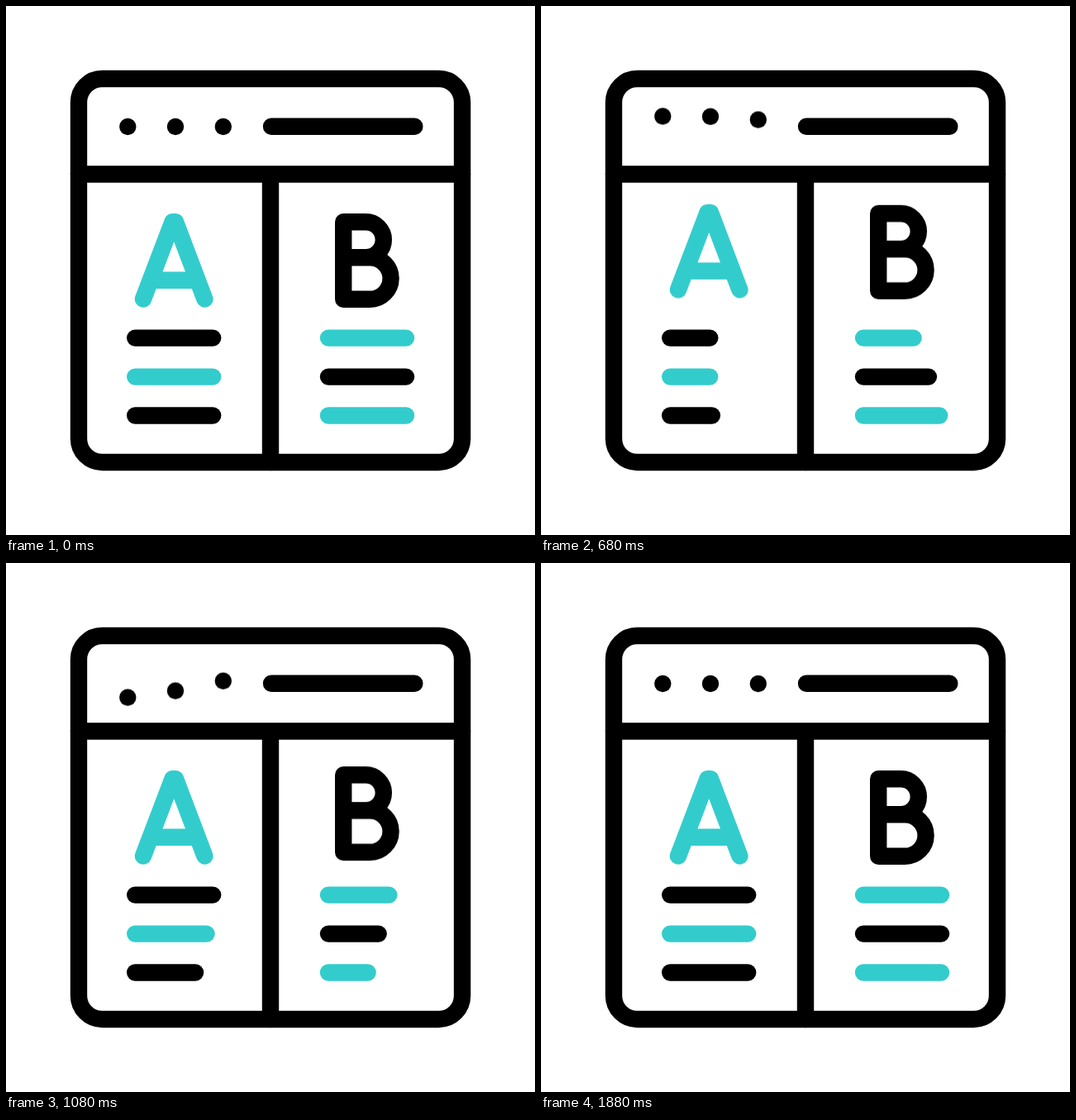
An HTML page without scripts that plays this animation: 640 by 640 pixels, repeating every 1.92 s.

```html
<!DOCTYPE html>
<html lang="en">
<head>
<meta charset="utf-8">
<title>A/B page</title>
<style>
html, body { margin: 0; width: 100%; height: 100%; overflow: hidden; background: #fff; }
svg { display: block; width: 100%; height: 100%; }

.ink { fill: none; stroke: #000; stroke-width: 20.4; stroke-linecap: round; stroke-linejoin: round; }
.teal { stroke: #33cccc; }
.dots { fill: #000; }

.move, .row { animation: 1920ms ease-in-out infinite; }
.row { stroke-dasharray: 94 200; stroke-dashoffset: 0; }

/* dots: one wave, passed along */
.dot { animation-name: wave; }
.d2 { animation-delay: 120ms; }
.d3 { animation-delay: 240ms; }
@keyframes wave {
  0%, 8.2% { transform: translateY(0); }
  33.3% { transform: translateY(-13px); }
  60.4% { transform: translateY(18px); animation-timing-function: cubic-bezier(.4, 0, .4, 1); }
  86.2%, 100% { transform: translateY(0); }
}

/* letters hop */
.a { animation-name: hop-a; }
.b { animation-name: hop-b; }
@keyframes hop-a {
  0%, 6.8% { transform: translateY(0); }
  31.9% { transform: translateY(-12px); }
  51.9%, 100% { transform: translateY(0); }
}
@keyframes hop-b {
  0%, 18.5% { transform: translateY(0); }
  41.7%, 42.7% { transform: translateY(-12px); }
  67.2%, 100% { transform: translateY(0); }
}

/* text rows shorten and grow back */
.a1 { animation-name: row-a1; }
.a2 { animation-name: row-a2; }
.a3 { animation-name: row-a3; }
.b1 { animation-name: row-b1; }
.b2 { animation-name: row-b2; }
.b3 { animation-name: row-b3; }
@keyframes row-a1 {
  0%, 9% { stroke-dashoffset: 0; }
  32.4% { stroke-dashoffset: 47.5; }
  55.9%, 100% { stroke-dashoffset: 0; }
}
@keyframes row-a2 {
  0%, 14% { stroke-dashoffset: 0; }
  38.6%, 39.2% { stroke-dashoffset: 47.5; }
  62.9%, 100% { stroke-dashoffset: 0; }
}
@keyframes row-a3 {
  0%, 18% { stroke-dashoffset: 0; }
  40.6%, 44% { stroke-dashoffset: 48.5; }
  66.9%, 100% { stroke-dashoffset: 0; }
}
@keyframes row-b1 {
  0%, 20% { stroke-dashoffset: 0; }
  43% { stroke-dashoffset: 43; }
  69%, 100% { stroke-dashoffset: 0; }
}
@keyframes row-b2 {
  0%, 24.6% { stroke-dashoffset: 0; }
  50% { stroke-dashoffset: 40; }
  72.3%, 100% { stroke-dashoffset: 0; }
}
@keyframes row-b3 {
  0%, 32.2% { stroke-dashoffset: 0; }
  55.5% { stroke-dashoffset: 46.5; }
  80.7%, 100% { stroke-dashoffset: 0; }
}
</style>
</head>
<body>
<svg viewBox="0 0 640 640">
  <g class="ink">
    <rect x="88" y="88" width="464" height="464" rx="28.5"/>
    <path d="M88 203.5H552M320 203.5V552M321 145.7H494.3"/>
  </g>

  <g class="dots">
    <circle class="move dot" cx="147.3" cy="146" r="10.2"/>
    <circle class="move dot d2" cx="205" cy="146" r="10.2"/>
    <circle class="move dot d3" cx="262.8" cy="146" r="10.2"/>
  </g>

  <g class="ink">
    <path class="move a teal" d="M166 354.5L201.5 261.2H205L240.4 354.5M178 331.7H228"/>
    <path class="move b" d="M408.2 261.3H435.3a21.5 21.5 0 0 1 0 43H440.3a25.25 25.25 0 0 1 0 50.5H408.2ZM408.2 304.3H440"/>

    <path class="row a1" d="M156.2 401.6h94"/>
    <path class="row a2 teal" d="M156.2 448.6h94"/>
    <path class="row a3" d="M156.2 495.5h94"/>

    <path class="row b1 teal" d="M390 401.6h94"/>
    <path class="row b2" d="M390 448.6h94"/>
    <path class="row b3 teal" d="M390 495.5h94"/>
  </g>
</svg>
</body>
</html>
```
